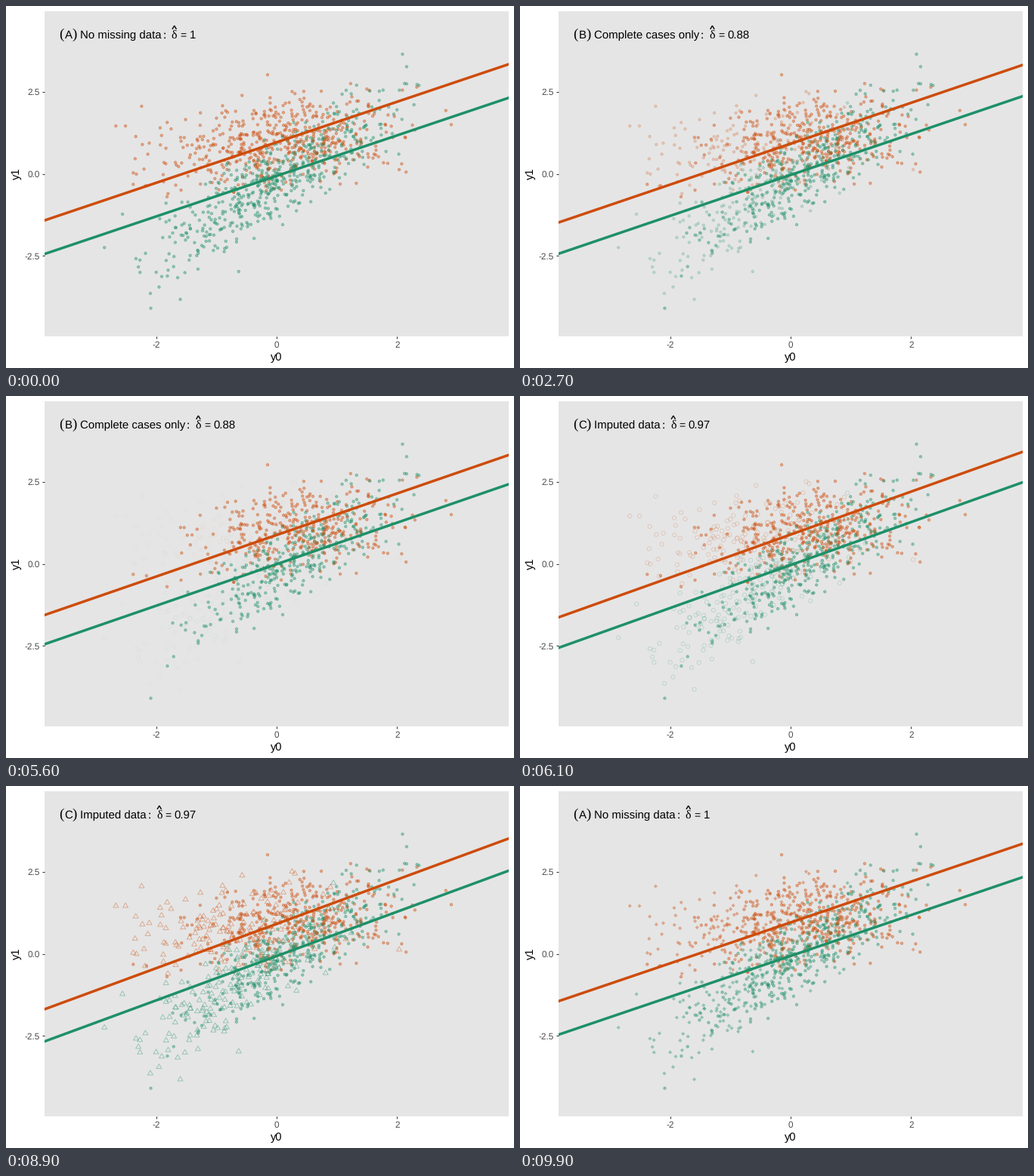
Animation, 672 px wide and 480 px high, one loop 10000 ms. Source, as a matplotlib script:

```python
import numpy as np
import matplotlib as mpl
import matplotlib.pyplot as plt
from matplotlib.animation import FuncAnimation
from matplotlib.collections import PathCollection
from matplotlib.patches import Rectangle
from matplotlib.path import Path
from matplotlib.transforms import Affine2D, IdentityTransform

mpl.rcParams["text.hinting"] = "none"

W, H, DPI = 672, 480, 96
PX = 72 / DPI                      # one pixel in points
LEFT, TOP, RIGHT, BOTTOM = 51.3, 7.3, 664.7, 437.7
CX, CY, SX, SY = 358, 222.5, 79.66, 43.47
EDGE = np.array([-3.85, 3.85])     # x limits in data units
ORANGE, GREEN = (0.804, 0.298, 0.043), (0.118, 0.565, 0.408)
ALPHA = 0.4
FRAMES, STEPS = 100, 12
STARTS = (21, 55, 88)              # last still frame of each state
R = 2.6                            # symbol radius

fig = plt.figure(figsize=(W / DPI, H / DPI), dpi=DPI, facecolor="white")
ax = fig.add_axes([0, 0, 1, 1])
ax.set(xlim=(0, W), ylim=(H, 0))
ax.axis("off")
panel = ax.add_patch(Rectangle((LEFT, TOP), RIGHT - LEFT, BOTTOM - TOP,
                               fc="#E5E5E5", ec="none", zorder=0))


def to_px(x, y):
    return CX + x * SX, CY - y * SY


def text(x, y, s, size, color="black", font="Liberation Sans", **kw):
    return ax.text(x, y, s, fontsize=size * PX, color=color, family=font,
                   va="baseline", zorder=5, **kw)


def stroke(xs, ys, width, color, **kw):
    return ax.plot(xs, ys, color=color, lw=width * PX, **kw)[0]


# Axes
def tick(xs, ys):
    stroke(xs, ys, 1.07, "#333333", solid_capstyle="butt")


for v in (-2.5, 0, 2.5):
    y = CY - v * SY
    tick([LEFT - 3.6, LEFT], [y, y])
    text(45, y + 4.2, f"{v:.1f}", 11.73, "#4D4D4D", ha="right")
for v in (-2, 0, 2):
    x = CX + v * SX
    tick([x, x], [BOTTOM, BOTTOM + 3.6])
    text(x, 453.2, str(v), 11.73, "#4D4D4D", ha="center")
text(CX, 470, "y0", 14.67, ha="center")
text(18.3, CY, "y1", 14.67, ha="center", rotation=90, rotation_mode="anchor")


# Titles
def title(letter, words, end, value):
    """One title; end is where the words stop."""
    serif = "Liberation Serif"
    return [
        text(70.3, 43.2, "(", 19, font=serif),
        text(77.6, 43, letter, 15),
        text(87.8, 43.2, ")", 19, font=serif),
        text(97.6, 43, words, 15),
        text(end + 3, 43, ":", 15.5, font=serif),
        text(end + 14.3, 43, "δ", 16, font=serif),
        text(end + 26, 43, "=", 14),
        text(end + 38, 43, value, 15),
        stroke(end + 18.2 + np.array([-2.4, 0, 2.4]), [30.2, 26.2, 30.2], 1.4,
               "black", zorder=5, solid_joinstyle="miter"),
    ]


titles = [title("A", "No missing data", 204.5, "1"),
          title("B", "Complete cases only", 236.2, "0.88"),
          title("C", "Imputed data", 184.6, "0.97")]


# Plot symbols, numbered by the usual pch codes; each is a list of strokes
def circle(r):
    return [Path.unit_circle().transformed(Affine2D().scale(r))]


def polygon(*pts):
    return [Path(list(pts) + [pts[0]], closed=True)]


def square(r):
    return polygon((-r, -r), (r, -r), (r, r), (-r, r))


def diamond(r):
    return polygon((-r, 0), (0, -r), (r, 0), (0, r))


def triangle(r):
    a = np.pi / 2 + np.arange(3) * 2 * np.pi / 3
    return polygon(*zip(1.555 * r * np.cos(a), 1.555 * r * np.sin(a)))


def plus(r):
    return [Path([(-r, 0), (r, 0)]), Path([(0, -r), (0, r)])]


def times(r):
    return [Path([(-r, -r), (r, r)]), Path([(-r, r), (r, -r)])]


Q = R * np.sqrt(2)
SYMBOLS = {
    1: circle(R),
    2: triangle(R),
    4: times(R),
    5: diamond(Q),
    7: square(R) + times(R),
    8: times(R) + plus(Q),
    10: circle(R) + plus(R),
    12: square(R) + plus(R),
    13: circle(R) + times(R),
    15: square(R),
    16: circle(R),
    18: diamond(R),
    20: circle(R * 2 / 3),
}
FILLED, BORDERLESS = {15, 16, 18, 20}, {15, 18}


# Points: a noisy line per group, plus a few far ones
GROUPS = [
    (ORANGE, 0.2, 0.95, [(-2.67, 1.46), (-2.51, 1.46), (-2.35, 0.46),
                         (-0.15, 3.02), (2.9, 1.5), (2.81, 1.93)]),
    (GREEN, 1.1, -0.17, [(-2.86, -2.25), (-2.56, -1.23), (-2.09, -4.1),
                         (-1.6, -3.83), (-0.63, -2.98), (2.09, 3.65)]),
]


def make_points(n=535, sd=0.68):
    rng = np.random.default_rng(12)
    pos, rgb, missing = [], [], []
    for color, slope, base, far in GROUPS:
        x, z = rng.normal(size=(2, 2 * n))
        keep = (abs(x) < 2.4) & (abs(z) < 2.3)
        x, z = x[keep][:n], z[keep][:n]
        y = base + slope * x + sd * z
        x, y = np.append(x, [p[0] for p in far]), np.append(y, [p[1] for p in far])
        pos.append(np.column_stack(to_px(x, y)))
        rgb.append(np.tile(color, (len(x), 1)))
        # low starting values drop out most often
        missing.append(rng.random(len(x)) < 1 / (1 + np.exp(1.1 + 1.5 * x)))
    order = rng.permutation(sum(map(len, pos)))
    return [np.concatenate(a)[order] for a in (pos, rgb, missing)]


pos, rgb, missing = make_points()
dots = PathCollection(SYMBOLS[20], offsets=pos, offset_transform=ax.transData,
                      transform=IdentityTransform(), linewidths=0.94 * PX,
                      zorder=2)
ax.add_collection(dots, autolim=False)

# Per state: common slope, green intercept, gap up to orange
FITS = np.array([(0.618, -0.064, 1.025), (0.629, -0.007, 0.882),
                 (0.681, -0.069, 0.977)])
orange_line, green_line = [stroke([LEFT, RIGHT], [0, 0], 3.5, c, zorder=3)
                           for c in (ORANGE, GREEN)]
for line in (orange_line, green_line):
    line.set_clip_path(panel)


def locate(i):
    """State at frame i and progress towards the next one."""
    for state, start in enumerate(STARTS):
        if i < start + STEPS:
            return state, max(0, i - start) / STEPS


def symbol_and_fade(state, t):
    """Symbol code and opacity of the missing cases."""
    if state == 0:
        return 20, 1 - t
    if state == 1:
        return 1, t
    return int(1 + 19 * t + 1e-9), 1


def draw_points(code, fade):
    alpha = np.where(missing, ALPHA * fade, ALPHA)
    fill = np.where(missing & (code not in FILLED), 0, alpha)
    edge = np.where(missing & (code in BORDERLESS), 0, alpha)
    parts = [SYMBOLS[code if m else 20] for m in missing]
    # strokes stay separate so that their crossings come out darker
    counts = [len(p) for p in parts]
    dots.set_paths([path for p in parts for path in p])
    dots.set_offsets(np.repeat(pos, counts, axis=0))
    dots.set_facecolor(np.repeat(np.column_stack([rgb, fill]), counts, axis=0))
    dots.set_edgecolor(np.repeat(np.column_stack([rgb, edge]), counts, axis=0))


def draw(i):
    state, t = locate(i)
    following = (state + 1) % 3
    draw_points(*symbol_and_fade(state, t))

    slope, base, gap = FITS[state] * (1 - t) + FITS[following] * t
    green_line.set_ydata(to_px(EDGE, base + slope * EDGE)[1])
    orange_line.set_ydata(to_px(EDGE, base + gap + slope * EDGE)[1])

    shown = state if t < 0.5 else following
    for k, parts in enumerate(titles):
        for part in parts:
            part.set_visible(k == shown)
    return [dots]


anim = FuncAnimation(fig, draw, frames=FRAMES, interval=100, repeat=True,
                     repeat_delay=0, blit=False)
plt.show()
```
